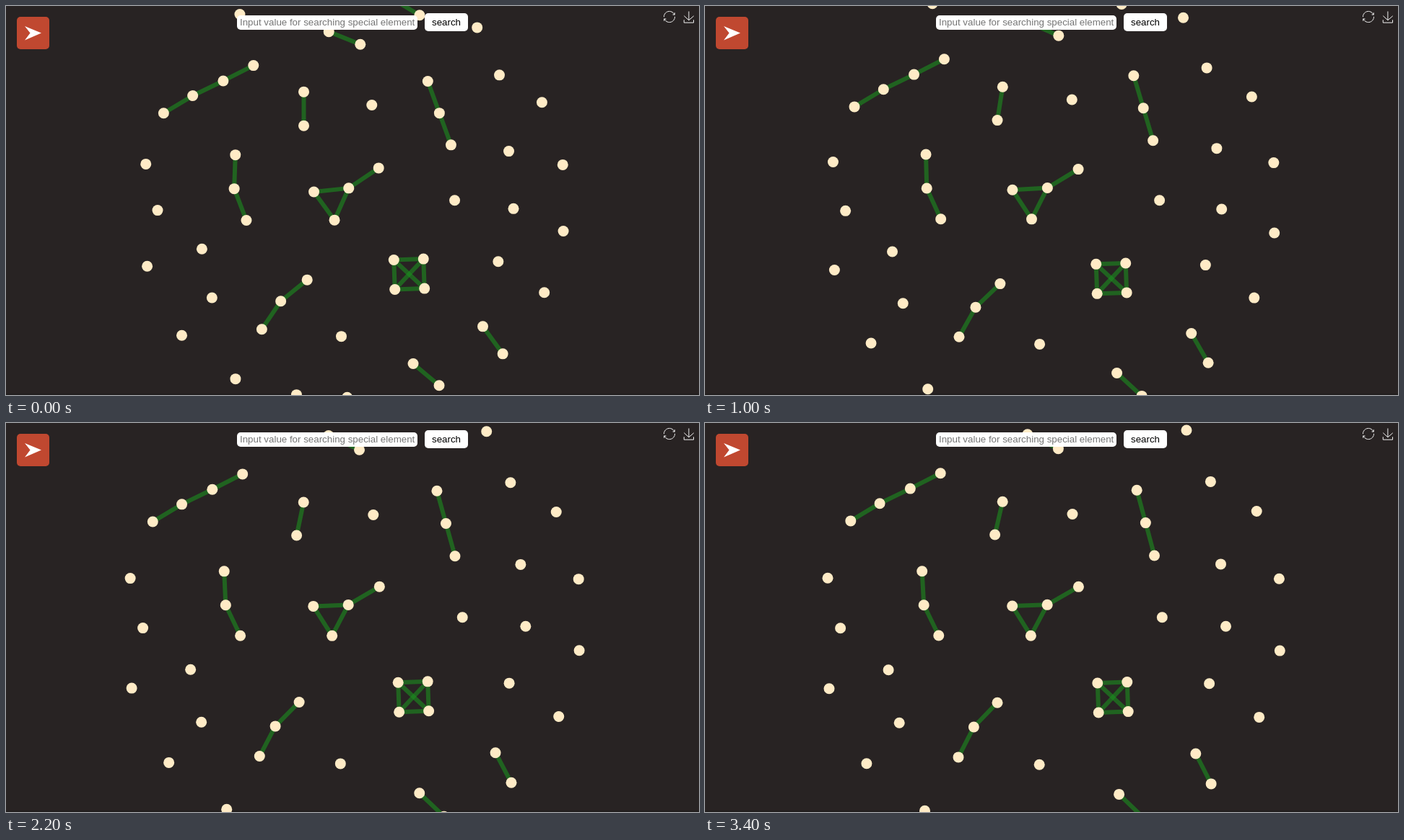
Animation of 960 by 540 pixels, one loop 8000 ms. Source, as an HTML page:

```html
<!DOCTYPE html>
<html lang="en">
<head>
<meta charset="utf-8">
<title>Node graph</title>
<style>
  html, body { margin: 0; width: 100%; height: 100%; overflow: hidden; background: #282323; }
  svg { display: block; width: 100vw; height: 100vh; }
  text { font: 13.3333px "Liberation Sans", Arial, sans-serif; }
  #links { stroke: #1c8e1e; stroke-opacity: .6; stroke-width: 6; }
  #nodes { fill: #ffebc6; }
  .icon { fill: none; stroke: #f2f2f2; stroke-width: 1; }
  .icon path { vector-effect: non-scaling-stroke; }
</style>
</head>
<body>
<svg viewBox="0 0 960 540">
  <rect width="960" height="540" fill="#282323"/>
  <rect y="538" width="960" height="2" fill="#221e1e"/>
  <g id="links"></g>
  <g id="nodes"></g>

  <rect x="15" y="15" width="45" height="45" rx="5" fill="#c04830"/>
  <path d="M26 28L49 37.5L26 47.5L33.5 37.5Z" fill="#fff"/>

  <rect x="320" y="13" width="250" height="20" rx="5" fill="#fff"/>
  <text x="324" y="27" fill="#757575">Input value for searching special element</text>
  <rect x="580" y="10" width="60" height="25" rx="5" fill="#fff"/>
  <text x="610" y="27" text-anchor="middle">search</text>

  <g class="icon" transform="translate(919 15) scale(.27) translate(-30 -30)">
    <path d="M47 18.9h9.8V8.7M56.3 20.1C52.1 9 40.5.6 26.8 2.1C12.6 3.7 1.6 16.2 2.1 30.6M13 41.1H3.1v10.2M3.7 39.9c4.2 11.1 15.8 19.5 29.5 18c14.2-1.6 25.2-14.1 24.7-28.5"/>
  </g>
  <g class="icon" transform="translate(946 15.3) scale(.27) translate(-29.6 -29)">
    <path d="M4.7 22.9L29.3 45.5L54.7 23.4M4.6 43.6V58H53.8V43.6M29.2 45.1V0"/>
  </g>
</svg>
<script>
const LOOP = 8000, STEP = 100, SETTLED = 3400;
const CENTER = { x: 480, y: 270 }, SHRINK = 0.0766, LINK = 47;
const RAD = Math.PI / 180;
const groups = [], links = [];

function add(tag, parent) {
  const el = document.createElementNS("http://www.w3.org/2000/svg", tag);
  return document.getElementById(parent).appendChild(el);
}

function set(el, attrs) {
  for (const key in attrs) el.setAttribute(key, attrs[key]);
}

function step(p, heading, length = LINK) {
  return { x: p.x + length * Math.cos(heading * RAD), y: p.y + length * Math.sin(heading * RAD) };
}

function ring(x, y, count, radius, first) {
  return Array.from({ length: count }, (_, i) => step({ x, y }, first + i * 360 / count, radius));
}

// A group rests at the given points, having turned by `turn` degrees on the way.
function addGroup(points, pairs = [], turn = 0) {
  const mean = key => points.reduce((sum, p) => sum + p[key], 0) / points.length;
  const mid = { x: mean("x"), y: mean("y") };
  const nodes = points.map(p => ({ dx: p.x - mid.x, dy: p.y - mid.y, el: add("circle", "nodes") }));
  nodes.forEach(n => set(n.el, { r: 7.5 }));
  pairs.forEach(([a, b]) => links.push({ a: nodes[a], b: nodes[b], el: add("line", "links") }));
  groups.push({ mid, nodes, turn });
}

function addChain(x, y, turn, ...headings) {
  const points = [{ x, y }];
  headings.forEach((h, i) => points.push(step(points[i], h)));
  addGroup(points, headings.map((_, i) => [i, i + 1]), turn);
}

addChain(201.8, 135.9, 0, -31, -26, -27);
addChain(412.2, 109.2, 13, 103);
addChain(598.2, 93.2, 5, 75, 75);
addChain(300.7, 205.8, -5, 87, 64);
addChain(405, 388.2, -7, 134, 117);
addChain(679.8, 459, 9, 63);
addChain(573.6, 515.4, 4, 44);
addChain(446.8, 15.8, 3, 25);
addChain(579, -9.6, 0, -149);

const kite = ring(450.4, 267.2, 3, 28, -152);
addGroup([...kite, step(kite[1], -30, 50)], [[0, 1], [1, 2], [0, 2], [1, 3]], 4);
addGroup(ring(565, 380.8, 4, 29, -137), [[0, 1], [1, 2], [2, 3], [3, 0], [0, 2], [1, 3]]);

const loose = [
  [311, -10], [667, 10], [700.4, 81.4], [764.2, 122.5], [509, 126.5], [170, 215.2],
  [187.6, 284.7], [172, 368.8], [254.1, 342.8], [269.2, 416.2], [223.9, 472.8],
  [304.5, 538.2], [396, 562], [472, 566], [463.2, 474.3], [714.5, 195.9], [795.4, 216.3],
  [633.3, 269.7], [721.5, 282.3], [796.3, 316.1], [698.6, 361.8], [767.7, 408.4]
];
loose.forEach(([x, y]) => addGroup([{ x, y }]));

// Cooling force layout: a quick first push, then a slow drift to rest.
const cool = t => 0.79 * Math.exp(-t / 1330) + 0.271 * Math.exp(-t / 200);
const remaining = t => (cool(t) - cool(SETTLED)) / (cool(0) - cool(SETTLED));

function draw(time) {
  const t = Math.min(Math.floor(time % LOOP / STEP) * STEP, SETTLED);
  const left = remaining(t), scale = 1 - SHRINK * left;
  for (const { mid, nodes, turn } of groups) {
    const x = CENTER.x + (mid.x - CENTER.x) * scale;
    const y = CENTER.y + (mid.y - CENTER.y) * scale;
    const cos = Math.cos(turn * left * RAD), sin = Math.sin(turn * left * RAD);
    for (const n of nodes) {
      n.x = x + n.dx * cos + n.dy * sin;
      n.y = y + n.dy * cos - n.dx * sin;
      set(n.el, { cx: n.x, cy: n.y });
    }
  }
  for (const { a, b, el } of links) set(el, { x1: a.x, y1: a.y, x2: b.x, y2: b.y });
}

const begin = performance.now();
function tick() {
  draw(performance.now() - begin);
  requestAnimationFrame(tick);
}
tick();
</script>
</body>
</html>
```
